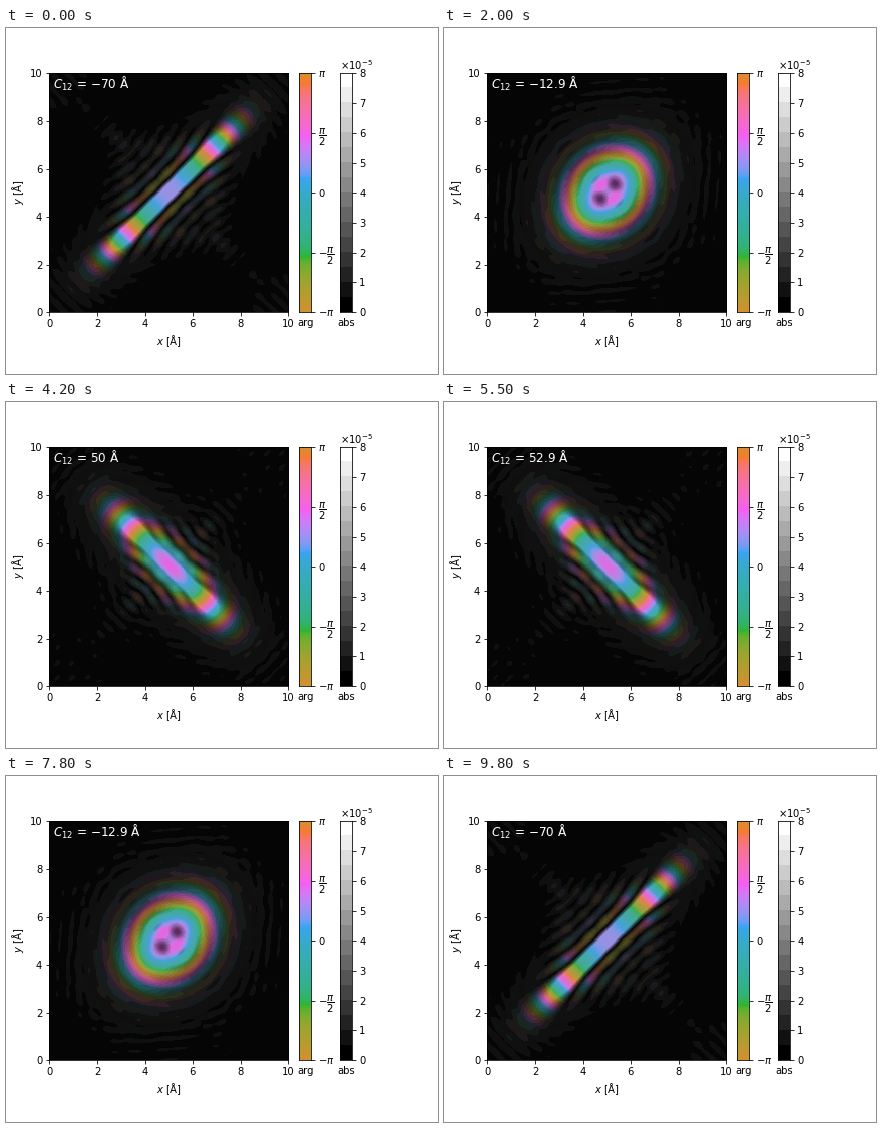
Recreate the animation shown at these times as a matplotlib script. Size 432 by 346 pixels, loop 9900 ms.

```python
import numpy as np
import matplotlib.pyplot as plt
from matplotlib.animation import FuncAnimation

W, H, DPI = 432, 346, 72
SIDE = 239.2          # plot size in pixels
LEFT, TOP = 43.2, 45.2
BAR_WIDTH = 12
PIXELS = 239
EXTENT = 10.0         # angstrom
WAVELENGTH = 0.025079 # angstrom, 200 keV electrons
CUTOFF = 0.030        # rad
DEFOCUS = 70.0        # angstrom
GPTS = 200
VMAX = 8e-5
LEVELS = 16
STEPS = 50
FRAMES = 2 * STEPS - 1

XYZ_TO_RGB = np.array([
    [3.240969941904521, -1.537383177570093, -0.498610760293],
    [-0.96924363628087, 1.87596750150772, 0.041555057407175],
    [0.055630079696993, -0.20397695888897, 1.056971514242878],
])


def hsluv(hue, saturation=0.9, light=65.0):
    """HSLuv colours for hues in degrees."""
    theta = np.radians(hue)
    sub = (light + 16) ** 3 / 1560896
    chroma = np.full(theta.shape, np.inf)
    for m1, m2, m3 in XYZ_TO_RGB:
        for t in (0, 1):
            top1 = (284517 * m1 - 94839 * m3) * sub
            top2 = ((838422 * m3 + 769860 * m2 + 731718 * m1) * light * sub
                    - 769860 * t * light)
            bottom = (632260 * m3 - 126452 * m2) * sub + 126452 * t
            reach = top2 / bottom / (np.sin(theta) - top1 / bottom * np.cos(theta))
            chroma = np.where(reach > 0, np.minimum(chroma, reach), chroma)
    chroma = chroma * saturation
    u = chroma * np.cos(theta) / (13 * light) + 0.19783000664283
    v = chroma * np.sin(theta) / (13 * light) + 0.46831999493879
    y = ((light + 16) / 116) ** 3
    x = 9 * y * u / (4 * v)
    z = (9 * y - 15 * v * y - v * x) / (3 * v)
    rgb = np.stack([x, np.full_like(x, y), z], axis=-1) @ XYZ_TO_RGB.T
    rgb = np.clip(rgb, 0, 1)
    return np.where(rgb <= 0.0031308, 12.92 * rgb,
                    1.055 * rgb ** (1 / 2.4) - 0.055)


# colours of phases from -pi to pi
N_HUES = 512
PHASE_COLORS = hsluv((45 + np.arange(N_HUES) * 360 / N_HUES) % 360)

# aperture with a soft edge, on the few frequencies that pass it
freq = np.arange(-14, 15) / EXTENT
kx, ky = np.meshgrid(freq, freq)
alpha = WAVELENGTH * np.hypot(kx, ky)
phi = np.arctan2(ky, kx)
aperture = np.clip((CUTOFF - alpha) * EXTENT / WAVELENGTH + 0.5, 0, 1)
aperture /= np.sqrt((aperture ** 2).sum())

pos = (np.arange(PIXELS) + 0.5) * EXTENT / PIXELS - EXTENT / 2 - EXTENT / GPTS / 2
waves = np.exp(2j * np.pi * np.outer(pos, freq))


def probe(c12):
    curvature = DEFOCUS - c12 * np.cos(2 * (phi - np.pi / 4))
    spectrum = aperture * np.exp(1j * np.pi / WAVELENGTH * alpha ** 2 * curvature)
    return waves @ spectrum @ waves.T / GPTS ** 2


def colorize(psi):
    """Phase as hue, stepped magnitude as brightness; dim parts turn gray."""
    level = np.floor(np.abs(psi) / VMAX * LEVELS).clip(0, LEVELS - 1)[..., None]
    index = ((np.angle(psi) + np.pi) / (2 * np.pi) * N_HUES).astype(int) % N_HUES
    tint = np.clip((level - 0.5) / 6, 0, 0.85)
    color = tint * PHASE_COLORS[index] + (1 - tint) * 0.68
    return color * (level + 0.5) / LEVELS


def astigmatism(frame):
    step = min(frame, FRAMES - 1 - frame)
    return -70 + 140 * step / (STEPS - 1)


def label(c12):
    return f"$C_{{12}}$ = {c12:.3g} Å".replace("-", "\u2212")


plt.rcParams.update({"font.family": "DejaVu Sans", "font.size": 10})
fig = plt.figure(figsize=(W / DPI, H / DPI), dpi=DPI, facecolor="white")


def axes_px(left, width):
    return fig.add_axes([left / W, 1 - (TOP + SIDE) / H, width / W, SIDE / H])


def text_px(x, baseline, text, **style):
    return fig.text(x / W, 1 - baseline / H, text, va="baseline", **style)


def color_bar(left, colors, name, ticks, names):
    bar = axes_px(left, BAR_WIDTH)
    bar.imshow(colors[:, None, :], origin="lower", aspect="auto",
               extent=[0, 1, 0, 1], interpolation="nearest")
    bar.set_xticks([])
    bar.yaxis.tick_right()
    bar.set_yticks(ticks, names)
    text_px(left + BAR_WIDTH / 2, 298, name, ha="center")


ax = axes_px(LEFT, SIDE)
image = ax.imshow(colorize(probe(-70)), origin="lower", aspect="auto",
                  extent=[0, EXTENT, 0, EXTENT], interpolation="nearest")
ax.set_xticks(range(0, 11, 2))
ax.set_yticks(range(0, 11, 2))
ax.set_xlabel("$x$ [Å]")
ax.set_ylabel("$y$ [Å]")
caption = text_px(47, 61, label(-70), color="white", fontsize=12)

ARG_LEFT, ABS_LEFT = 293.2, 334.1
color_bar(ARG_LEFT, PHASE_COLORS, "arg", np.linspace(0, 1, 5),
          [r"$-\pi$", r"$-\dfrac{\pi}{2}$", "0", r"$\dfrac{\pi}{2}$", r"$\pi$"])
grays = np.repeat(np.linspace(0, 1, LEVELS)[:, None], 3, axis=1)
color_bar(ABS_LEFT, grays, "abs", np.linspace(0, 1, 9), [str(i) for i in range(9)])
text_px(ABS_LEFT, 42, r"$\times\mathdefault{10^{-5}}$")


def update(frame):
    c12 = astigmatism(frame)
    image.set_data(colorize(probe(c12)))
    caption.set_text(label(c12))
    return image, caption


anim = FuncAnimation(fig, update, frames=FRAMES, interval=100,
                     repeat=True, repeat_delay=0, blit=False)
plt.show()
```
